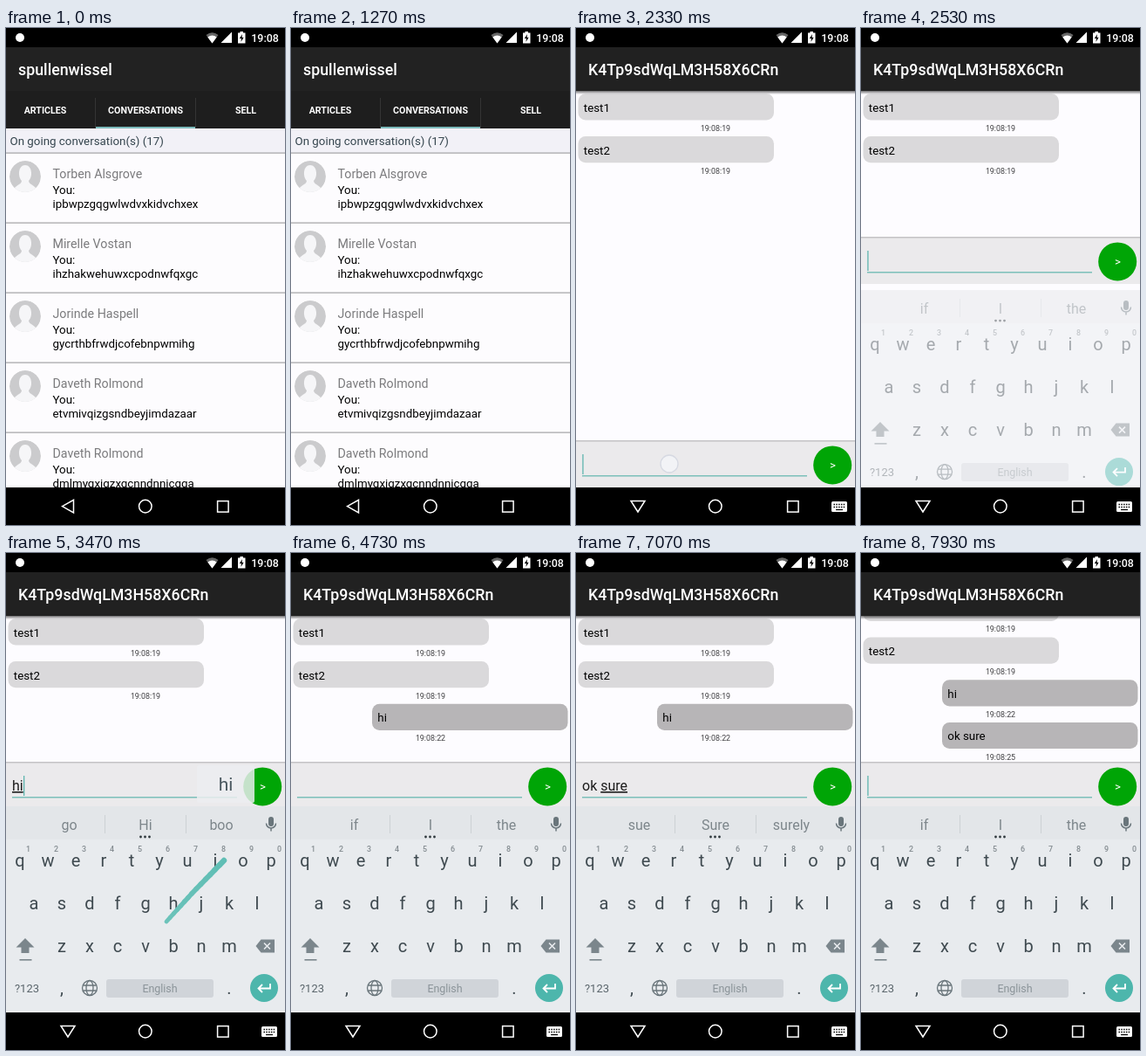
An HTML page that plays this animation: 320x569 px, repeating every 8000 ms.

```html
<!DOCTYPE html>
<html lang="en">
<head>
<meta charset="utf-8">
<title>Chat demo</title>
<style>
  html, body { margin: 0; width: 100%; height: 100%; overflow: hidden; background: #000; }
  svg { display: block; width: 320px; height: 569px; font-family: Roboto, "Noto Sans", sans-serif; font-size: 13.33px; }
  .mid { text-anchor: middle; }
  .title { font-size: 17.8px; font-weight: 500; fill: #fff; }
  .tab { font-size: 10.67px; font-weight: 700; fill: #fff; text-anchor: middle; }
  .name { font-size: 14.22px; fill: #7b7b7d; }
  .time { font-size: 8.9px; fill: #3c3c3e; text-anchor: middle; }
  .key { font-size: 20px; fill: #3f4a50; text-anchor: middle; }
  .hint { font-size: 8.9px; font-weight: 500; fill: #838b90; text-anchor: middle; }
  .word { font-size: 16px; fill: #7d868b; text-anchor: middle; }
  .line { fill: none; stroke: #fff; stroke-width: 1.5; }
</style>
</head>
<body>
<svg viewBox="0 0 320 569">
  <defs>
    <clipPath id="listClip"><rect y="142" width="320" height="384"/></clipPath>
    <clipPath id="chatClip"><rect id="chatArea" y="72" width="320" height="401"/></clipPath>
    <clipPath id="face"><circle r="18"/></clipPath>
    <linearGradient id="shade" x2="0" y2="1">
      <stop stop-color="#000" stop-opacity=".55"/><stop offset="1" stop-color="#000" stop-opacity="0"/>
    </linearGradient>
    <g id="avatar" clip-path="url(#face)">
      <circle r="18" fill="#cbcbcd"/>
      <path d="M-15 19C-14 10-4 10-4 5C-9 0-8-13 0-13S9 0 4 5C4 10 14 10 15 19Z" fill="#f6f6f8"/>
    </g>
  </defs>

  <g id="listScreen">
    <rect y="22" width="320" height="504" fill="#fdfcfe"/>
    <rect y="22" width="320" height="50" fill="#222"/>
    <rect y="72" width="320" height="43" fill="#1e1e1e"/>
    <text class="title" x="14" y="54">spullenwissel</text>
    <path d="M102.5 80V114M217.5 80V114" stroke="#343434"/>
    <rect x="103" y="113" width="114" height="2" fill="#7cbabb"/>
    <text class="tab" x="45" y="97.6">ARTICLES</text>
    <text class="tab" x="160" y="97.6">CONVERSATIONS</text>
    <text class="tab" x="275" y="97.6">SELL</text>
    <rect y="115" width="320" height="28" fill="#f2f1f7"/>
    <text x="4.5" y="134.3" fill="#35454e">On going conversation(s) (17)</text>
    <g id="rows" clip-path="url(#listClip)"></g>
  </g>

  <g id="chatScreen">
    <rect y="22" width="320" height="504" fill="#fdfcff"/>
    <g clip-path="url(#chatClip)"><g id="messages"></g></g>
    <rect y="72" width="320" height="4" fill="url(#shade)"/>
    <rect y="22" width="320" height="50" fill="#212121"/>
    <text class="title" x="14" y="54">K4Tp9sdWqLM3H58X6CRn</text>
    <g id="bar">
      <rect y="473" width="320" height="53" fill="#ebeaec"/>
      <rect y="472" width="320" height="1.5" fill="#c4c3c6"/>
      <rect x="7" y="512" width="258" height="1.5" fill="#7cc0ba"/>
      <text id="input" x="7" y="505" font-size="16" fill="#1c1c1c" xml:space="preserve"><tspan id="done"></tspan><tspan id="draft" text-decoration="underline"></tspan></text>
      <rect id="caret" y="488" width="1.3" height="23" fill="#5fb5ae"/>
      <circle cx="294.2" cy="500.4" r="22" fill="#00a506"/>
      <text class="mid" x="294.5" y="505" fill="#fff">&gt;</text>
    </g>
  </g>

  <g id="keyboard">
    <rect y="290" width="320" height="236" fill="#e8ebee"/>
    <rect y="290" width="320" height="38" fill="#e3e6e9"/>
    <path d="M113.5 300V321M206.5 300V321" stroke="#cdd2d5"/>
    <g id="words">
      <text class="word" x="72.5" y="317"></text>
      <text class="word" x="160" y="317"></text>
      <text class="word" x="247" y="317"></text>
    </g>
    <g fill="#2f383c"><circle cx="154.5" cy="325" r="1.4"/><circle cx="159.5" cy="325" r="1.4"/><circle cx="164.5" cy="325" r="1.4"/></g>
    <rect x="301" y="302" width="6" height="11" rx="3" fill="#69757b"/>
    <path d="M298.5 309.5a5.5 5.5 0 0 0 11 0M304 315V318.5" fill="none" stroke="#69757b" stroke-width="1.5"/>
    <g id="keys"></g>
    <path d="M22 441L32.5 451.5H26.5V458H17.5V451.5H11.5Z" fill="#7b868c"/>
    <rect x="15.5" y="465" width="14" height="1.6" fill="#7b868c"/>
    <path d="M286.5 450L292.5 442.5H308V457.5H292.5Z" fill="#7b868c"/>
    <path d="M296 446.5L303 453.5M303 446.5L296 453.5" stroke="#e8ebee" stroke-width="1.6"/>
    <text class="mid" x="24" y="503" font-size="13" fill="#5a656b">?123</text>
    <g fill="none" stroke="#69757b" stroke-width="1.3">
      <circle cx="96" cy="498" r="8.5"/><ellipse cx="96" cy="498" rx="4" ry="8.5"/>
      <path d="M88 495H104M88 501H104"/>
    </g>
    <rect x="115" y="488" width="123" height="21" rx="3" fill="#d0d4d9"/>
    <text class="mid" x="176.5" y="502.5" font-size="12.44" fill="#8b9499">English</text>
    <circle cx="296" cy="498" r="16" fill="#4db6ac"/>
    <path d="M303 493V498.5H290M294 494L289.5 498.5L294 503" fill="none" stroke="#fff" stroke-width="1.8"/>
  </g>

  <g id="trail" stroke-linecap="round"></g>
  <g id="preview">
    <rect x="-33" y="-109" width="66" height="43" rx="2" fill="#eceef1" opacity=".94"/>
    <text class="mid" y="-80" font-size="21" fill="#37474f"></text>
  </g>

  <rect width="320" height="22"/>
  <circle cx="16" cy="11" r="5" fill="#fff"/>
  <g fill="#fff">
    <path d="M229.5 8Q236.5 2.5 243.5 8L236.5 17.5Z" fill="#666"/>
    <path d="M231.3 10.4Q236.5 6.5 241.7 10.4L236.5 17.5Z"/>
    <path d="M259 4.5V17H246.5Z"/>
    <path d="M266 5.5H268.5V4H272V5.5H274.5V17.5H266Z"/>
    <text x="281.3" y="15.7" font-size="12.44" font-weight="500">19:08</text>
  </g>
  <path d="M271 7L267.8 12H270L269.4 16L272.7 10.8H270.5Z"/>

  <rect y="526" width="320" height="43"/>
  <path id="back" class="line" d="M64.5 547.6L77.5 540.3V555Z"/>
  <g id="imeNav">
    <path class="line" d="M63 541.5H79L71 554Z"/>
    <rect x="293" y="542" width="18" height="12" rx="1.5" fill="#fff"/>
    <path d="M295.5 545.5H309M295.5 548.5H309" stroke="#000" stroke-width="1.3" stroke-dasharray="1.5 1.3"/>
    <path d="M298 551.5H306" stroke="#000" stroke-width="1.3"/>
  </g>
  <circle class="line" cx="159.8" cy="547.6" r="7.3"/>
  <rect class="line" x="242.6" y="541.6" width="12.5" height="12.5"/>

  <circle id="finger" r="10" fill="#f4f5f9" fill-opacity=".75" stroke="#d6d9e2" stroke-width="1.3"/>
</svg>

<script>
const LOOP = 8000, LIFT = 233;
const $ = id => document.getElementById(id);
const clamp = v => Math.min(1, Math.max(0, v));
const ease = v => 1 - (1 - clamp(v)) ** 3;
const show = (el, on) => el.setAttribute("visibility", on ? "visible" : "hidden");
const shift = (el, x, y) => el.setAttribute("transform", `translate(${x} ${y})`);
const setText = (el, s) => { if (el.textContent !== s) el.textContent = s; };
// Last step whose time has come
const latest = (steps, t) => steps.filter(s => s[0] <= t).pop();

// Static parts
const people = [
  ["Torben Alsgrove", "ipbwpzgqgwlwdvxkidvchxex"],
  ["Mirelle Vostan", "ihzhakwehuwxcpodnwfqxgc"],
  ["Jorinde Haspell", "gycrthbfrwdjcofebnpwmihg"],
  ["Daveth Rolmond", "etvmivqizgsndbeyjimdazaar"],
  ["Daveth Rolmond", "dmlmyqxigzxgcnndnnicgga"]
];
$("rows").innerHTML = people.map(([name, line], i) => `
  <g transform="translate(0 ${143 + 80 * i})">
    <rect y="-.5" width="320" height="1.2" fill="#a3a3a6"/>
    <use href="#avatar" x="22" y="27"/>
    <text class="name" x="53.5" y="29">${name}</text>
    <text x="53.5" y="47">You:</text>
    <text x="53.5" y="63">${line}</text>
  </g>`).join("");

const messages = [
  ["test1", "19:08:19", 0, 0], ["test2", "19:08:19", 0, 0],
  ["hi", "19:08:22", 1, 4230], ["ok sure", "19:08:25", 1, 7730]
];
$("messages").innerHTML = messages.map(([text, time, mine], i) => `
  <g transform="translate(0 ${75.3 + 48.7 * i})">
    <rect x="${mine ? 93 : 2.5}" width="224.5" height="30.2" rx="8.5" fill="${mine ? "#b7b5b7" : "#dad9db"}"/>
    <text x="${mine ? 99.3 : 8.8}" y="20.5">${text}</text>
    <text class="time" x="160" y="42.7">${time}</text>
  </g>`).join("");

const keyRow = (letters, x, y) => [...letters].map((c, i) =>
  `<text class="key" x="${x + 32 * i}" y="${y}">${c}</text>`).join("");
$("keys").innerHTML = keyRow("qwertyuiop", 16, 359) + keyRow("asdfghjkl", 32, 408) +
  keyRow("zxcvbnm", 64, 457) + keyRow(",", 64, 505) + keyRow(".", 256, 505) +
  [..."1234567890"].map((c, i) => `<text class="hint" x="${25.5 + 32 * i}" y="341.5">${c}</text>`).join("");

// Timeline
const typed = [
  [0, "", ""], [3440, "", "hi"], [4230, "", ""],
  [5600, "", "ok"], [5760, "ok", ""], [6270, "ok ", "sure"], [7730, "", ""]
];
const caretResets = [[2270], [3440], [4230], [5600], [6270], [7730]];
const suggestions = [
  [0, "if", "I", "the"], [3270, "go", "Hi", "boo"], [4470, "if", "I", "the"],
  [5330, "pl", "Ok", "ol"], [5930, "So", "do", "shi"],
  [6200, "sue", "Sure", "surely"], [7870, "if", "I", "the"]
];
// Finger paths as [time, x, y]; "words" is the floating guess
const swipes = [
  { path: [[3090, 184, 422], [3160, 213, 390], [3230, 250, 352]], up: 3440, words: [[3150, "hi"]] },
  { path: [[5110, 277, 349], [5200, 270, 375], [5300, 258, 408]], up: 5560, words: [[5200, "ok"]] },
  { path: [[5700, 66, 400], [5770, 118, 384], [5840, 178, 371], [5900, 218, 361], [5950, 244, 348],
           [6030, 136, 341], [6070, 93, 341], [6120, 79, 345]], up: 6200, words: [[5850, "so"], [6110, "sure"]] }
];
const taps = [[2200, 2370, 107, 499], [4000, 4140, 294, 267], [7560, 7700, 294, 267]];
const LAG = 40, LIFE = 650, HOLD = 250;

function posAt(path, t) {
  let i = 1;
  while (i < path.length - 1 && path[i][0] < t) i++;
  const [a, b] = [path[i - 1], path[i]];
  const k = clamp((t - a[0]) / (b[0] - a[0]));
  return [a[1] + (b[1] - a[1]) * k, a[2] + (b[2] - a[2]) * k];
}

function trailOf({ path }, t) {
  const start = path[0][0], end = path[path.length - 1][0];
  const head = Math.min(end, t - LAG);
  const opacity = 1 - clamp((t - end - HOLD) / (LIFE - HOLD));
  if (head <= start || opacity <= 0) return "";
  let out = "";
  for (let s = start; s < head; s += 10) {
    const age = (t - s) / LIFE;
    if (age >= 1) continue;
    const [x1, y1] = posAt(path, s), [x2, y2] = posAt(path, Math.min(head, s + 10));
    out += `<path d="M${x1} ${y1}L${x2} ${y2}" stroke-width="${9.5 - 8 * age}" stroke="hsl(174,42%,${50 + 16 * age}%)"/>`;
  }
  return `<g opacity="${opacity}">${out}</g>`;
}

function drawTouch(t) {
  $("trail").innerHTML = swipes.map(s => trailOf(s, t)).join("");

  const tap = taps.find(([from, to]) => t >= from && t < to);
  const swipe = swipes.find(s => t >= s.path[0][0] && t < s.up);
  const finger = tap ? tap.slice(2) : swipe && posAt(swipe.path, t);
  show($("finger"), finger);
  if (finger) shift($("finger"), ...finger);

  const guess = swipes.find(s => t >= s.words[0][0] && t < s.up + 120);
  show($("preview"), guess);
  if (!guess) return;
  const [x, y] = posAt(guess.path, t - LAG);
  shift($("preview"), x + 2, y);
  $("preview").setAttribute("opacity", 1 - clamp((t - guess.up - 20) / 100));
  setText($("preview").lastElementChild, latest(guess.words, t)[1]);
}

function drawChat(t) {
  const enter = t - 1330;
  show($("chatScreen"), enter > 0);
  show($("listScreen"), t < 1730);
  shift($("chatScreen"), 0, 45 * (1 - ease(enter / 350)));
  $("chatScreen").setAttribute("opacity", clamp(enter / 200));

  const lifted = t >= 2470;
  shift($("bar"), 0, lifted ? -LIFT : 0);
  $("chatArea").setAttribute("height", lifted ? 401 - LIFT : 401);
  messages.forEach((m, i) => { $("messages").children[i].style.display = t >= m[3] ? "" : "none"; });
  shift($("messages"), 0, -27.5 * ease((t - 7730) / 150));

  const [, done, draft] = latest(typed, t);
  setText($("done"), done);
  setText($("draft"), draft);
  const reset = latest(caretResets, t);
  show($("caret"), reset && Math.floor((t - reset[0]) / 500) % 2 === 0);
  $("caret").setAttribute("x", 7.3 + (done || draft ? $("input").getComputedTextLength() : 0));
}

function drawKeyboard(t) {
  const rise = (t - 2470) / 200;
  show($("keyboard"), rise > 0);
  shift($("keyboard"), 0, 30 * (1 - ease(rise)));
  $("keyboard").setAttribute("opacity", clamp(rise * 1.5));
  latest(suggestions, t).slice(1).forEach((w, i) => setText($("words").children[i], w));
  show($("back"), t < 2270);
  show($("imeNav"), t >= 2270);
}

const origin = performance.now();
function frame() {
  const t = Math.max(0, performance.now() - origin) % LOOP;
  drawChat(t);
  drawKeyboard(t);
  drawTouch(t);
  requestAnimationFrame(frame);
}
frame();
</script>
</body>
</html>
```
